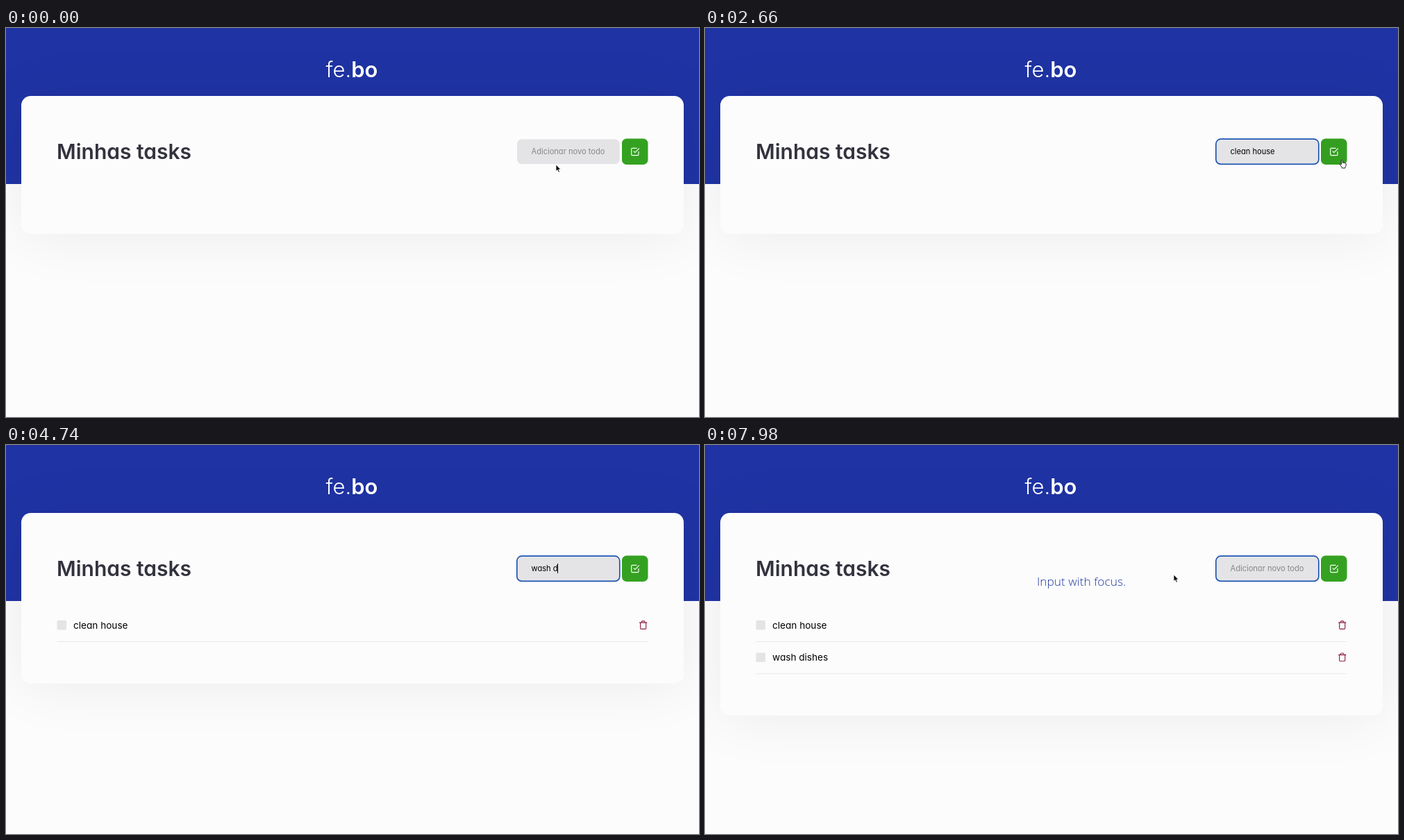
An HTML page for the animation above (8 s loop, 998 px wide and 561 px high).

```html
<!DOCTYPE html>
<html lang="pt">
<head>
<meta charset="utf-8">
<title>Minhas tasks</title>
<style>
  html, body { margin: 0; width: 100%; height: 100%; overflow: hidden; background: #fcfcfd; }
  header { position: absolute; left: 0; top: 0; width: 100%; height: 225px; background: #1f33a4; }
  #card {
    position: absolute; left: 22px; top: 97.5px; width: 953.5px; border-radius: 13.6px;
    background: #fcfcfd; box-shadow: 0 3px 85px rgba(0, 0, 0, .07);
  }
  svg { position: absolute; left: 0; top: 0; }
  text { font-family: Inter, sans-serif; font-feature-settings: "cv11"; white-space: pre; }
  .logo { font-size: 31px; font-weight: 300; fill: #fff; }
  .logo tspan, .title { font-weight: 600; }
  .title { font-size: 30px; fill: #33333f; }
  .task { font-size: 13.6px; fill: #000; }
  #value { font-size: 11.1px; }
  #note { font: 300 17.3px "Open Sans", sans-serif; fill: #20379f; }
  .icon { fill: none; stroke-width: 2; stroke-linecap: round; stroke-linejoin: round; }
</style>
</head>
<body>
<header></header>
<div id="card"></div>
<svg width="998" height="561" viewBox="0 0 998 561">
  <defs>
    <g id="row">
      <rect x="73.5" y="253" width="13.5" height="13.5" rx="1.5" fill="#e4e4e6"/>
      <g class="icon" stroke="#8c1f3d" transform="translate(910.8 252.7) scale(.575)">
        <path d="M3 6H21M19 6V20a2 2 0 0 1-2 2H7a2 2 0 0 1-2-2V6M8 6V4a2 2 0 0 1 2-2h4a2 2 0 0 1 2 2V6"/>
      </g>
      <rect x="73.5" y="283" width="851" height="1" fill="#e8e8ec"/>
    </g>
  </defs>

  <text class="logo" x="460.5" y="71">fe.<tspan>bo</tspan></text>
  <text class="title" x="73" y="188.5">Minhas tasks</text>

  <rect x="736" y="160.5" width="147.7" height="35.7" rx="6.8" fill="#e4e4e6"/>
  <rect id="ring" x="735.8" y="160.2" width="148" height="36.2" rx="7" fill="none" stroke="#1c55b3" stroke-width="1.7"/>
  <text id="value" x="756.5" y="182"></text>
  <rect id="caret" y="171" width="1" height="14"/>

  <rect id="button" x="887" y="159.5" width="37.5" height="37.5" rx="6.8" fill="#35a121"/>
  <g class="icon" stroke="#fff" transform="translate(899 171.6) scale(.57)">
    <path d="M9 11l3 3L22 4M21 12v7a2 2 0 0 1-2 2H5a2 2 0 0 1-2-2V5a2 2 0 0 1 2-2h11"/>
  </g>

  <g class="item"><use href="#row"/><text class="task" x="97" y="265">clean house</text></g>
  <g class="item" transform="translate(0 46.4)"><use href="#row"/><text class="task" x="97" y="265">wash dishes</text></g>
  <text id="note" x="478" y="202.5">Input with focus.</text>

  <g id="arrow" class="pointer">
    <path d="M0 0V9.6L2.2 7.6L3.7 11.2L5.4 10.5L3.9 7H6.8Z" stroke="#fff" stroke-width=".8"/>
  </g>
  <g id="beam" class="pointer">
    <path d="M-2-5Q0-5 0-3.8Q0-5 2-5M0-4V4M-2 5Q0 5 0 3.8Q0 5 2 5M-1 1H1" fill="none" stroke="#111"/>
  </g>
  <g id="hand" class="pointer">
    <path d="M-2.6-5.4q1-.8 1.8.2V-1.6q1-.7 1.7.2q1-.6 1.7.3q1.3-.4 1.6.8V2.4L3 4.4V6H-1.8V4.6L-4.6 1q-.2-1.3 1.2-1L-2.6.8Z"
          fill="#fff" stroke="#111" stroke-width=".9" stroke-linejoin="round"/>
  </g>
</svg>
<script>
const LOOP = 8000, BLINK = 530;
const ADDED = [3000, 6360];
const PLACEHOLDER = "Adicionar novo todo";

// time, x, y; straight eased moves between the stops
const PATH = [
  [0, 792, 197], [120, 792, 197], [420, 801, 181], [2200, 801, 181], [2620, 919, 196],
  [3060, 919, 196], [3340, 861, 180], [6750, 861, 180], [7450, 675, 187], [LOOP, 675, 187]
];
const POINTERS = [
  [0, "arrow"], [280, "beam"], [950, ""], [2200, "beam"], [2440, "arrow"], [2530, "hand"],
  [3220, "beam"], [4040, ""], [6750, "beam"], [6960, "arrow"]
];
const FOCUS = [[0, false], [500, true], [3000, false], [3340, true]];
const CARET_START = [[0, 0], [500, 500], [3340, 3340 - BLINK], [6360, 6360]];

const typed = (word, times) => [...word].map((_, i) => [times(i), word.slice(0, i + 1)]);
const VALUES = [
  [0, ""],
  ...typed("clean house", i => i < 7 ? 950 + i * 135 : 1760 + (i - 6) * 88),
  [ADDED[0], ""],
  ...typed("wash dishes", i => i < 6 ? 4040 + i * 135 : 4715 + (i - 5) * 197),
  [ADDED[1], ""]
];

const el = id => document.getElementById(id);
const show = (node, on) => { node.style.visibility = on ? "visible" : "hidden"; };
const clamp = v => Math.max(0, Math.min(1, v));
const ease = v => v * v * (3 - 2 * v);
const latest = (steps, t) => steps.findLast(step => step[0] <= t);
const items = document.querySelectorAll(".item");
const pointers = document.querySelectorAll(".pointer");

function position(t) {
  const next = PATH.findIndex(stop => stop[0] > t);
  const [a, b] = [PATH[next - 1], PATH[next]];
  const k = ease((t - a[0]) / (b[0] - a[0]));
  return [a[1] + (b[1] - a[1]) * k, a[2] + (b[2] - a[2]) * k];
}

function drawInput(t) {
  const [keyTime, text] = latest(VALUES, t);
  const focused = latest(FOCUS, t)[1];
  const value = el("value");
  value.textContent = text || PLACEHOLDER;
  value.setAttribute("fill", text ? "#000" : "#85858c");
  show(el("ring"), focused);

  const start = Math.max(text ? keyTime : 0, latest(CARET_START, t)[1]);
  const x = 756.5 + (text ? value.getComputedTextLength() : 0);
  el("caret").setAttribute("x", Math.floor(x));
  show(el("caret"), focused && (t - start) % (2 * BLINK) < BLINK);
}

function draw(t) {
  const count = ADDED.filter(time => t >= time).length;
  el("card").style.height = 199.5 + count * 46.5 + "px";
  items.forEach((item, i) => show(item, i < count));
  drawInput(t);

  const hover = clamp((t - 2600) / 200) - clamp((t - 3360) / 200);
  el("button").style.filter = `brightness(${1 - .06 * hover})`;
  el("note").style.opacity = clamp((t - 7000) / 300);

  const kind = latest(POINTERS, t)[1];
  const [x, y] = position(t);
  pointers.forEach(pointer => {
    show(pointer, pointer.id === kind);
    pointer.setAttribute("transform", `translate(${x} ${y})`);
  });
}

const begin = performance.now();
function frame(now) {
  draw(Math.max(0, now - begin) % LOOP);
  requestAnimationFrame(frame);
}
draw(0);
requestAnimationFrame(frame);
</script>
</body>
</html>
```
